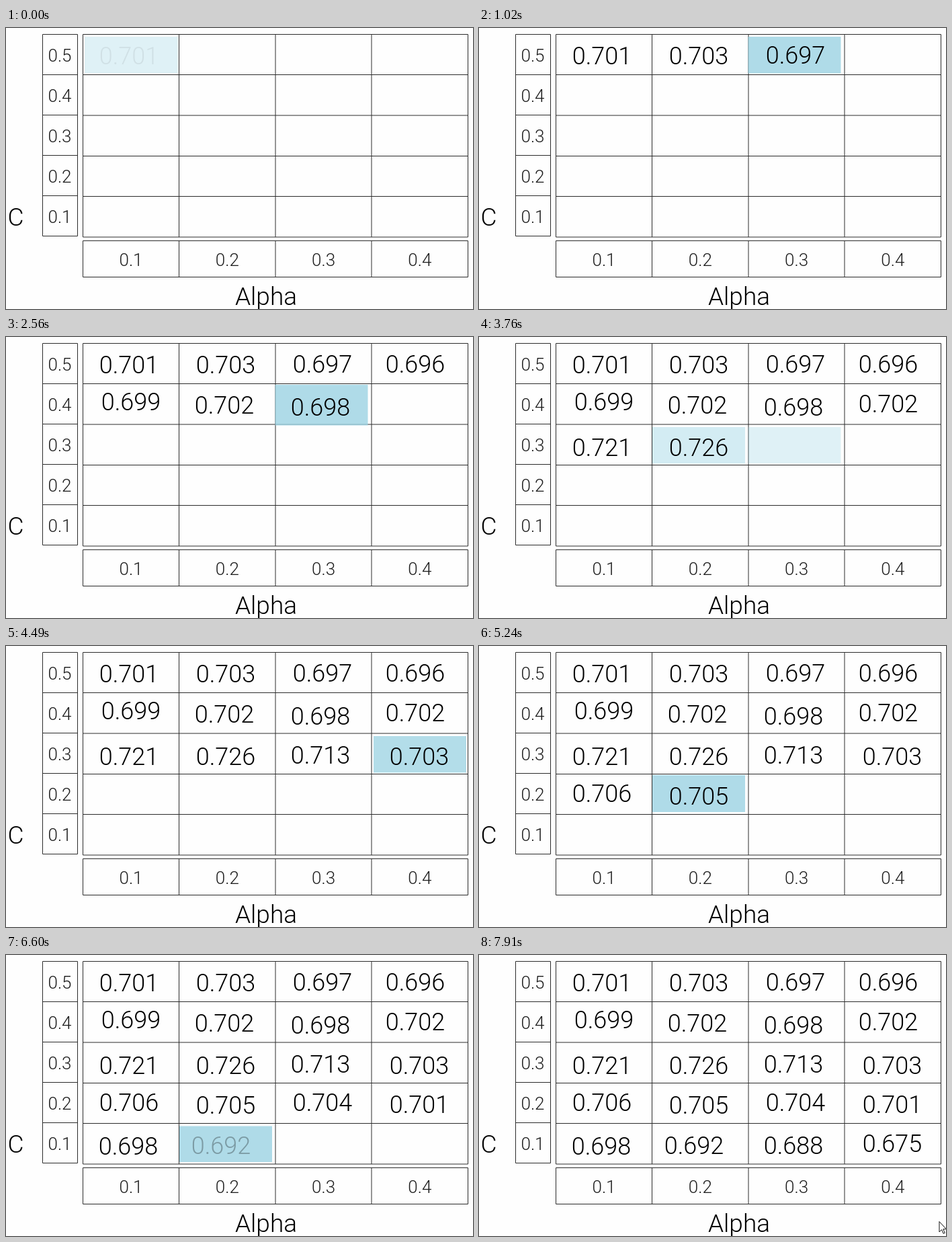
Recreate the animation shown at these times as an HTML page. Size 695 by 418 pixels, loop 8 s.

```html
<!DOCTYPE html>
<html lang="en">
<head>
<meta charset="utf-8">
<style>
  html, body { margin: 0; width: 100%; height: 100%; overflow: hidden; background: #fefefe; }
  svg { display: block; width: 695px; height: 418px; }
  text { font: 300 36px Roboto, "Liberation Sans", sans-serif; text-anchor: middle; fill: #000; }
  .label { font-size: 26px; fill: #1c1c1c; }
  .axis { font-size: 37px; }
  .lines { fill: none; stroke: #2c2c2c; stroke-width: 1; }
  .mark { fill: #9cd3e3; }
</style>
</head>
<body>
<svg id="stage" viewBox="0 0 695 418">
  <path class="lines" d="M54.5 9.5h52v300h-52zM54.5 69.5h52M54.5 129.5h52M54.5 189.5h52M54.5 249.5h52"/>
  <path class="lines" d="M114.5 9.5h573v301.5h-573zM114.5 69.5h573M114.5 130h573M114.5 190.5h573M114.5 250.5h573M257.5 9.5v301.5M401 9.5v301.5M544 9.5v301.5"/>
  <path class="lines" d="M114.5 316.5h573v54h-573zM257.5 316.5v54M401 316.5v54M544 316.5v54"/>
  <text class="axis" x="14.5" y="294">C</text>
  <text class="axis" x="387" y="412">Alpha</text>
  <path id="cursor" d="M685 396.5v15.5l3.6-3.4 2.5 5.8 2.2-1-2.5-5.6h4.7z" fill="#fff" stroke="#111"/>
</svg>
<script>
const LOOP = 8000, STEP = 385;
const svg = document.getElementById('stage');
const cursor = document.getElementById('cursor');

// Each entry: value, centre x, centre y
const rows = [
  [[.701, 183, 41], [.703, 327, 41], [.697, 471, 40], [.696, 609, 40]],
  [[.699, 186, 96], [.702, 325, 101], [.698, 468, 104], [.702, 609, 99]],
  [[.721, 183, 164], [.726, 327, 164], [.713, 468, 162], [.703, 615, 164]],
  [[.706, 183, 219], [.705, 327, 223], [.704, 471, 219], [.701, 615, 222]],
  [[.698, 182, 284], [.692, 320, 283], [.688, 468, 283], [.675, 615, 280]]
];
const colX = [117, 258, 400.5, 547];
const bands = [[13, 54.5], [71, 60.5], [134, 54.5], [192, 55], [254.5, 53.5]];

function add(tag, attrs, content = '') {
  const el = document.createElementNS('http://www.w3.org/2000/svg', tag);
  for (const name in attrs) el.setAttribute(name, attrs[name]);
  el.textContent = content;
  return svg.insertBefore(el, cursor);
}

for (let i = 0; i < 5; i++)
  add('text', { class: 'label', x: 80, y: 49.5 + i * 60 }, (0.5 - i / 10).toFixed(1));
for (let i = 0; i < 4; i++)
  add('text', { class: 'label', x: 186 + i * 143.3, y: 354 }, (0.1 + i / 10).toFixed(1));

const cells = rows.flatMap((row, r) => row.map(([value, x, y], c) => ({
  mark: add('rect', { class: 'mark', x: colX[c], y: bands[r][0], width: c ? 138 : 139, height: bands[r][1] }),
  text: add('text', { x, y: y + 13 }, value.toFixed(3))
})));

const ramp = (t, from, to) => Math.min(1, Math.max(0, (t - from) / (to - from)));

function draw(now) {
  const t = now % LOOP;
  cells.forEach(({ mark, text }, i) => {
    const phase = t - i * STEP;
    const lead = i ? 130 : 40; // the first highlight comes in later
    const shown = ramp(phase, -lead, 100 - lead) - ramp(phase, 250, 350);
    mark.setAttribute('opacity', 0.8 * shown);
    text.setAttribute('opacity', ramp(phase, -15, 230));
  });
  cursor.setAttribute('visibility', t >= 7910 ? 'visible' : 'hidden');
}

let start;
function tick(now) {
  start ??= now;
  draw(now - start);
  requestAnimationFrame(tick);
}
draw(0);
requestAnimationFrame(tick);
</script>
</body>
</html>
```
